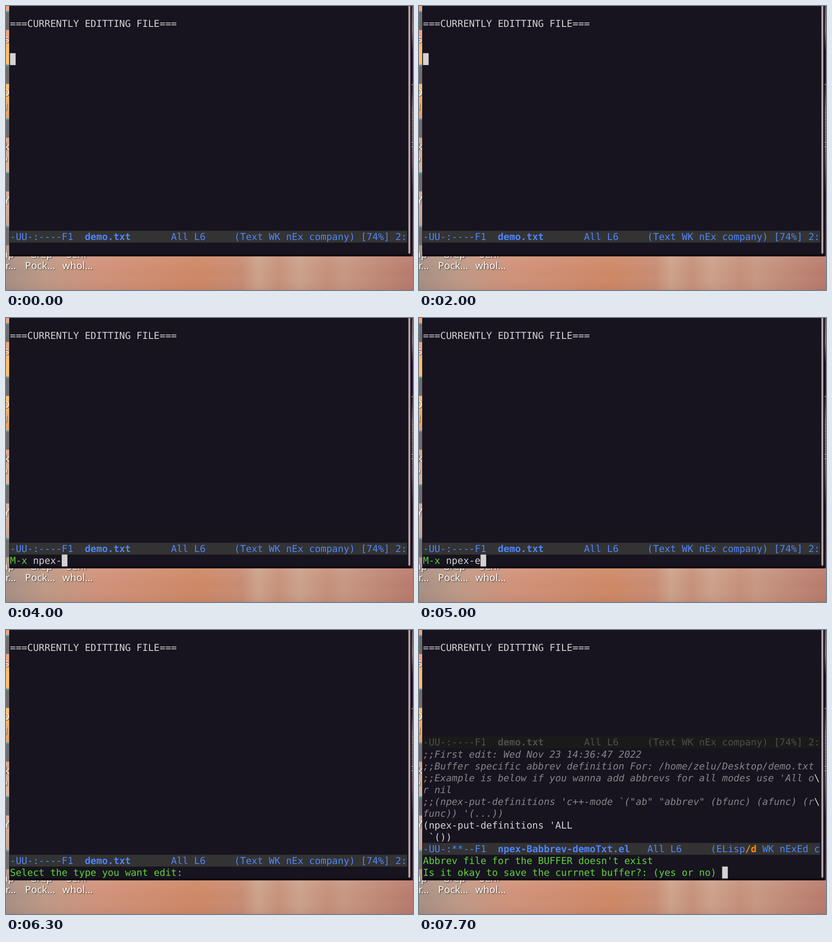
Write an HTML page that moves like this. It is 896 px wide and 625 px high and loops after 8000 ms.

```html
<!DOCTYPE html>
<html lang="en">
<head>
<meta charset="utf-8">
<title>Editor session</title>
<style>
  html, body { margin: 0; width: 100%; height: 100%; overflow: hidden; background: #17141f; }
  svg { display: block; width: 896px; height: 625px; }
  text { white-space: pre; text-rendering: geometricPrecision; }
  #term text { font: 21.04px "DejaVu Sans Mono", monospace; fill: #d3d3d3; }
  #icons text { font: 22px "Noto Sans", sans-serif; fill: #fff; filter: drop-shadow(1px 1px 1px #000b); }
  #term .mode { fill: #4f84fa; }
  #term .idle { fill: #4d4d4d; }
  #term .note { fill: #878487; font-style: italic; }
  #term .ask { fill: #5fd33a; }
  .warn { fill: #ff8c00; }
  .warn, .bold { font-weight: bold; }
  .plain { fill: #d3d3d3; font-style: normal; }
</style>
</head>
<body>
<svg viewBox="0 0 896 625">
  <defs>
    <linearGradient id="floor">
      <stop offset="0" stop-color="#a68f84"/>
      <stop offset=".1" stop-color="#be9986"/>
      <stop offset=".22" stop-color="#cf927b"/>
      <stop offset=".38" stop-color="#ce8b6e"/>
      <stop offset=".47" stop-color="#cd8765"/>
      <stop offset=".58" stop-color="#c78c74"/>
      <stop offset=".62" stop-color="#cca28b"/>
      <stop offset=".67" stop-color="#c69079"/>
      <stop offset=".72" stop-color="#cba18b"/>
      <stop offset=".79" stop-color="#c48f7a"/>
      <stop offset=".83" stop-color="#c69782"/>
      <stop offset="1" stop-color="#b7796b"/>
    </linearGradient>
    <linearGradient id="shade" x2="0" y2="1">
      <stop offset="0" stop-color="#ffe4d0" stop-opacity=".1"/>
      <stop offset=".5" stop-color="#ffe4d0" stop-opacity="0"/>
      <stop offset="1" stop-color="#6b4034" stop-opacity=".1"/>
    </linearGradient>
    <linearGradient id="side" x2="0" y2="1">
      <stop offset="0" stop-color="#eaa57c"/>
      <stop offset=".12" stop-color="#eea584"/>
      <stop offset=".17" stop-color="#f8be70"/>
      <stop offset=".32" stop-color="#f9c270"/>
      <stop offset=".43" stop-color="#e3a16c"/>
      <stop offset=".51" stop-color="#dba48c"/>
      <stop offset=".68" stop-color="#d8b5a0"/>
      <stop offset=".85" stop-color="#caa697"/>
      <stop offset="1" stop-color="#ab9487"/>
    </linearGradient>
    <linearGradient id="edge" x2="0" y2="1">
      <stop offset="0" stop-color="#6b5a64"/>
      <stop offset=".1" stop-color="#847680"/>
      <stop offset=".18" stop-color="#2c193c"/>
      <stop offset=".3" stop-color="#2a1838"/>
      <stop offset=".42" stop-color="#85777f"/>
      <stop offset=".62" stop-color="#6c5a68"/>
      <stop offset=".75" stop-color="#2c1c36"/>
      <stop offset="1" stop-color="#3c2832"/>
    </linearGradient>
    <pattern id="grain" width="4" height="5" patternUnits="userSpaceOnUse">
      <path d="M0 1.5L4 3" stroke="#190c28" stroke-opacity=".6"/>
    </pattern>
  </defs>

  <rect y="550" width="896" height="75" fill="url(#floor)"/>
  <rect y="550" width="896" height="75" fill="url(#shade)"/>
  <rect width="8" height="551" fill="url(#side)"/>
  <rect x="892" width="4" height="551" fill="url(#edge)"/>
  <rect x="892" width="4" height="551" fill="url(#grain)"/>
  <path d="M893 173h3M893 300h3M893 310h3" stroke="#eee"/>
  <g id="icons"></g>

  <rect x="7" width="886" height="551" fill="#17141f"/>
  <path d="M7 546.5H893V551H7zM890 0h3v551h-3z" fill="#0c080f"/>
  <path d="M885.8 0h4.4v543.5q-2.2 4-4.4 0z" fill="#b5a2a6"/>
  <g id="term"></g>
</svg>
<script>
const COL = 12.665, ROW = 26.05, LEFT = 8.8, LOOP = 8000;
const term = document.getElementById('term');
const icons = document.getElementById('icons');

const label = (x, y, s, anchor = 'start') => `<text x="${x}" y="${y}" text-anchor="${anchor}">${s}</text>`;
const line = (row, s, cls = '') => `<text class="${cls}" x="${LEFT}" y="${row * ROW + 20}">${s}</text>`;
const span = (cls, s) => `<tspan class="${cls}">${s}</tspan>`;
const cursor = (col, row) =>
  `<rect x="${LEFT + col * COL}" y="${row * ROW - .4}" width="12.4" height="26.2" fill="#d3d3d3"/>`;
const bar = (row, s, cls = 'mode', fill = '#333') =>
  `<rect x="8" y="${row * ROW - .3}" width="875" height="${ROW}" fill="${fill}"/>` + line(row, s, cls);

// Desktop icons peeking out from behind the window
let tiles = '';
for (let i = 0; i < 5; i++) {
  const y = 11 + i * 118.4;
  tiles += `<rect y="${y}" width="8" height="42" fill="#6f6e6d"/><rect y="${y}" width="8" height="3" fill="#4f9c9c"/>`;
}
icons.innerHTML = tiles +
  [['s', 7, 80], ['D', 8, 198], ['g', 3, 225], ['k', 8, 317], ['o', 3, 343], ['Y', 8, 435], ['np', 18, 554], ['r…', 22, 579]]
    .map(([s, x, y]) => label(x, y, s, 'end')).join('') +
  [['Grep', 77, 554], ['Seni', 155, 554], ['Pock…', 75, 579], ['whol…', 157.5, 579]]
    .map(([s, x, y]) => label(x, y, s, 'middle')).join('');

const title = line(1, '===CURRENTLY EDITTING FILE===');
const demoMode = `-UU-:----F1  ${span('bold', 'demo.txt')}       All L6     (Text WK nEx company) [74%] 2:`;
const base = title + bar(19, demoMode);

const idle = on => base + (on ? cursor(0, 4) : '');
const prompt = (ask, typed, on = true) =>
  base + line(20, span('ask', ask) + typed) + (on ? cursor(ask.length + typed.length, 20) : '');
const command = (typed, on) => prompt('M-x ', typed, on);
const select = (typed, on) => prompt('Select the type you want edit: ', typed, on);

const wrap = span('plain', '\\');
const notes = [
  ';;First edit: Wed Nov 23 14:36:47 2022',
  ';;Buffer specific abbrev definition For: /home/zelu/Desktop/demo.txt',
  `;;Example is below if you wanna add abbrevs for all modes use 'All o${wrap}`,
  'r nil',
  `;;(npex-put-definitions 'c++-mode \`("ab" "abbrev" (bfunc) (afunc) (r${wrap}`,
  "func)) '(...))"
];
const split = () => title + bar(9, demoMode, 'idle', '#1a1a1a') +
  notes.map((s, i) => line(10 + i, s, 'note')).join('') +
  line(16, "(npex-put-definitions 'ALL") + line(17, ' `())') +
  bar(18, `-UU-:**--F1  ${span('bold', 'npex-Babbrev-demoTxt.el')}   All L6     (ELisp${span('warn', '/d')} WK nExEd c`) +
  line(19, "Abbrev file for the BUFFER doesn't exist", 'ask') +
  line(20, 'Is it okay to save the currnet buffer?: (yes or no) ', 'ask') + cursor(52, 20);

const steps = [
  [0, idle(true)], [100, idle(false)], [800, idle(true)], [1400, idle(false)], [2000, idle(true)],
  [3100, command('')], [3500, command('n')], [3600, command('np')], [3700, command('npe')],
  [4000, command('npex-')], [4600, command('npex-', false)], [5000, command('npex-e')],
  [5200, command('npex-ed')], [5300, command('npex-edit-abbrevs')],
  [5700, select('')], [6300, select('', false)], [6800, select('')],
  [7000, select('b')], [7100, select('bu')], [7200, select('buffer')],
  [7700, split()]
];

let shown, start;
function draw(now) {
  start ??= now;
  const t = (now - start) % LOOP;
  const step = steps.findLast(([at]) => at <= t) || steps[0];
  if (step !== shown) term.innerHTML = (shown = step)[1];
  requestAnimationFrame(draw);
}
term.innerHTML = steps[0][1];
requestAnimationFrame(draw);
</script>
</body>
</html>
```
